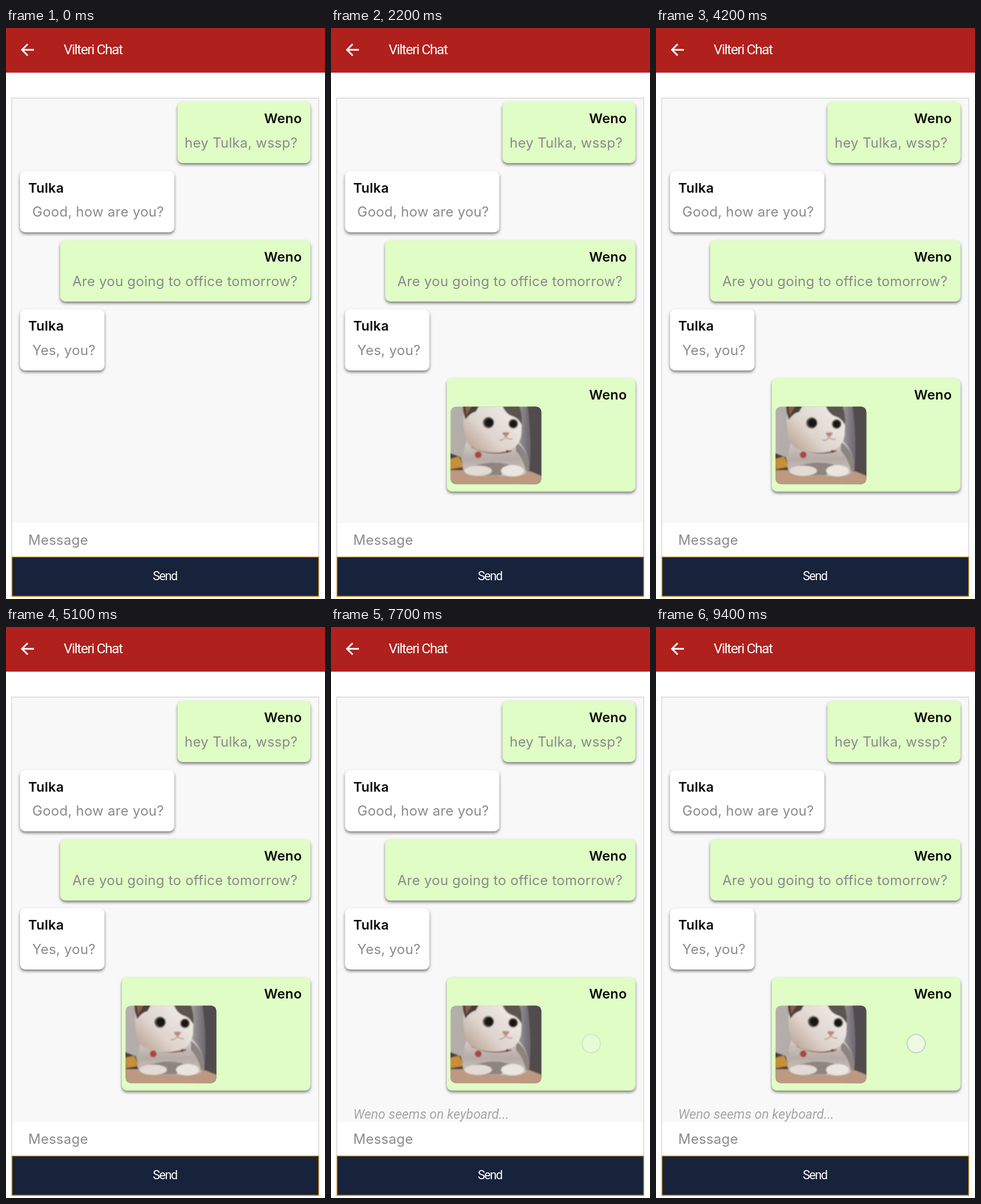
An HTML page for the animation above (9.5 s loop, 559 by 1002 pixels).

```html
<!DOCTYPE html>
<html lang="en">
<head>
<meta charset="utf-8">
<title>Chat</title>
<style>
html, body { margin: 0; width: 100%; height: 100%; overflow: hidden; background: #fff; }
svg { display: block; }
text { font: 24px Inter, "Open Sans", sans-serif; letter-spacing: .25px; fill: #8a8a8a; }
.name { font-weight: 600; font-size: 23.5px; fill: #0a0a0a; }
.end { text-anchor: end; }
.title { font: 24.5px Roboto, "Liberation Sans", sans-serif; letter-spacing: -1.4px; fill: #fff; }
.send { font-size: 21.5px; text-anchor: middle; }
.typing { font: italic 23px Roboto, "Liberation Sans", sans-serif; letter-spacing: 0; fill: #a6a6a6; }
.bubble { filter: drop-shadow(0 3px 2.5px rgba(0,0,0,.5)); }
</style>
</head>
<body>
<svg width="559" height="1002" viewBox="0 0 559 1002">
  <defs>
    <clipPath id="photo"><rect x="209.5" y="664.5" width="159" height="136" rx="9"/></clipPath>
    <filter id="soft"><feGaussianBlur stdDeviation="1"/></filter>
    <linearGradient id="wall">
      <stop offset="0" stop-color="#b5afac"/>
      <stop offset=".7" stop-color="#aaa5a3"/>
      <stop offset=".84" stop-color="#77727a"/>
      <stop offset="1" stop-color="#565053"/>
    </linearGradient>
    <linearGradient id="fur" x2="0" y2="1">
      <stop offset="0" stop-color="#d8d2ce"/>
      <stop offset=".55" stop-color="#b6aca7"/>
      <stop offset="1" stop-color="#cfc7c2"/>
    </linearGradient>
    <linearGradient id="face" x2=".8" y1=".8" y2=".1">
      <stop offset="0" stop-color="#bda697"/>
      <stop offset=".4" stop-color="#ded4cd"/>
      <stop offset="1" stop-color="#efeae7"/>
    </linearGradient>
  </defs>

  <rect width="559" height="78.4" fill="#b0201c"/>
  <path d="M49 38.3H28M38 28.3l-10 10 10 10" fill="none" stroke="#fff" stroke-width="2.9"/>
  <text class="title" x="101" y="46">Vilteri Chat</text>

  <rect x="10" y="123" width="538" height="875" fill="#f8f8f8" stroke="#dadada" stroke-width="1.6"/>
  <rect x="11" y="869" width="536" height="59" fill="#fff"/>
  <text x="39" y="906.5">Message</text>
  <rect x="10.5" y="928.2" width="537.5" height="69" fill="#17233a" stroke="#d6921f" stroke-width="1.4"/>
  <text class="title send" x="278.5" y="969">Send</text>

  <g id="chat"></g>

  <g id="reply">
    <g clip-path="url(#photo)">
      <rect x="209" y="664" width="160" height="137" fill="url(#wall)"/>
      <g filter="url(#soft)">
        <path d="M344 660h30v130h-28q8-60-2-130z" fill="#514b4e"/>
        <path d="M205 745l22 8 8 23h-30z" fill="#4a403c"/>
        <path d="M205 757l19-5 10 18-29 5z" fill="#c68f38"/>
        <path d="M205 776l144 2 25 10v17H205z" fill="#bd9981"/>
        <path d="M238 722q-9 28-7 51 4 14 28 12l62 1q22 1 26-14 1-30-24-52z" fill="url(#fur)"/>
        <path d="M324 726q24 18 23 46l-5 8q-4-24-18-38z" fill="#8c8480"/>
        <path d="M252 768q30-10 60-2l-14 19h-32z" fill="#8f8580"/>
        <ellipse cx="258" cy="777" rx="24" ry="9" fill="#e2dad5"/>
        <ellipse cx="318" cy="777" rx="20" ry="10" fill="#ebe5e1"/>
        <path d="M246 735q32 17 70 7" fill="none" stroke="#85504a" stroke-width="2.5"/>
        <g id="head">
          <path d="M237 655q-7 24-4 50 0 32 33 38 30 6 52-5 17-10 16-34 2-28-10-49z" fill="url(#face)"/>
          <path d="M231 655h33l-10 18q-11 3-18 14-5-12-5-32z" fill="#483e3a"/>
          <path d="M235 660h14l-12 20z" fill="#8d5c47"/>
          <path d="M298 655h29q9 21 7 41-7-13-17-15-14-5-19-26z" fill="#5c5450"/>
          <circle cx="276" cy="692.5" r="10" fill="#5a4f45"/>
          <circle cx="319.5" cy="694.5" r="8.5" fill="#5a4f45"/>
          <circle cx="277" cy="692.5" r="7.5" fill="#171515"/>
          <circle cx="319.5" cy="694.5" r="6.5" fill="#171515"/>
          <path d="M300 710q7-2 13 0-3 6-6 7-5-1-7-7z" fill="#bd8779"/>
          <path d="M306 717q-3 7-11 6M306 717q5 6 12 4" fill="none" stroke="#a58e83" stroke-width="1.6"/>
        </g>
        <circle cx="258" cy="749" r="6" fill="#a8473f"/>
        <circle cx="309" cy="743" r="2.5" fill="#703c39"/>
      </g>
    </g>
    <circle id="tap" cx="456" cy="731" r="16" fill="#eef9e6" fill-opacity=".85" stroke="#cbd5c8" stroke-width="2.2"/>
  </g>
  <text id="typing" class="typing" x="39" y="862.5">Weno seems on keyboard...</text>
</svg>
<script>
const LOOP = 9500, SENT = 1000, TYPING = 6000, TAP = 7500;
const $ = id => document.getElementById(id);

function bubble(mine, x, y, w, h, msg) {
  const name = mine ? 'Weno' : 'Tulka';
  const side = mine ? ' end' : '';
  return `<rect class="bubble" x="${x}" y="${y}" width="${w}" height="${h}" rx="9" fill="${mine ? '#dffdc5' : '#fff'}"/>
    <text class="name${side}" x="${mine ? 518.5 : 39}" y="${y + 37.5}">${name}</text>
    <text class="${side}" x="${mine ? 511 : 46}" y="${y + 80}">${msg}</text>`;
}

$('chat').innerHTML =
  bubble(true, 300.5, 129.5, 233, 107.5, 'hey Tulka, wssp?') +
  bubble(false, 24.5, 251, 270.5, 107.5, 'Good, how are you?') +
  bubble(true, 95, 372.5, 438.5, 107.5, 'Are you going to office tomorrow?') +
  bubble(false, 24.5, 493.5, 148, 107.5, 'Yes, you?');
$('reply').insertAdjacentHTML('afterbegin', bubble(true, 203, 614.5, 330.5, 199, ''));

function show(id, on) {
  $(id).style.display = on ? '' : 'none';
}

function draw(now) {
  const t = now % LOOP;
  show('reply', t >= SENT);
  show('typing', t >= TYPING);
  $('tap').setAttribute('opacity', Math.max(0, Math.min(1, (t - TAP) / 400)));
  // The cat lingers on each side and turns slowly between them.
  const turn = (1 - Math.tanh(3 * Math.cos((t - 2700) / 6000 * 2 * Math.PI))) / 2;
  $('head').setAttribute('transform', `translate(${-6 * turn} ${turn})`);
  requestAnimationFrame(draw);
}
draw(0);
</script>
</body>
</html>
```
